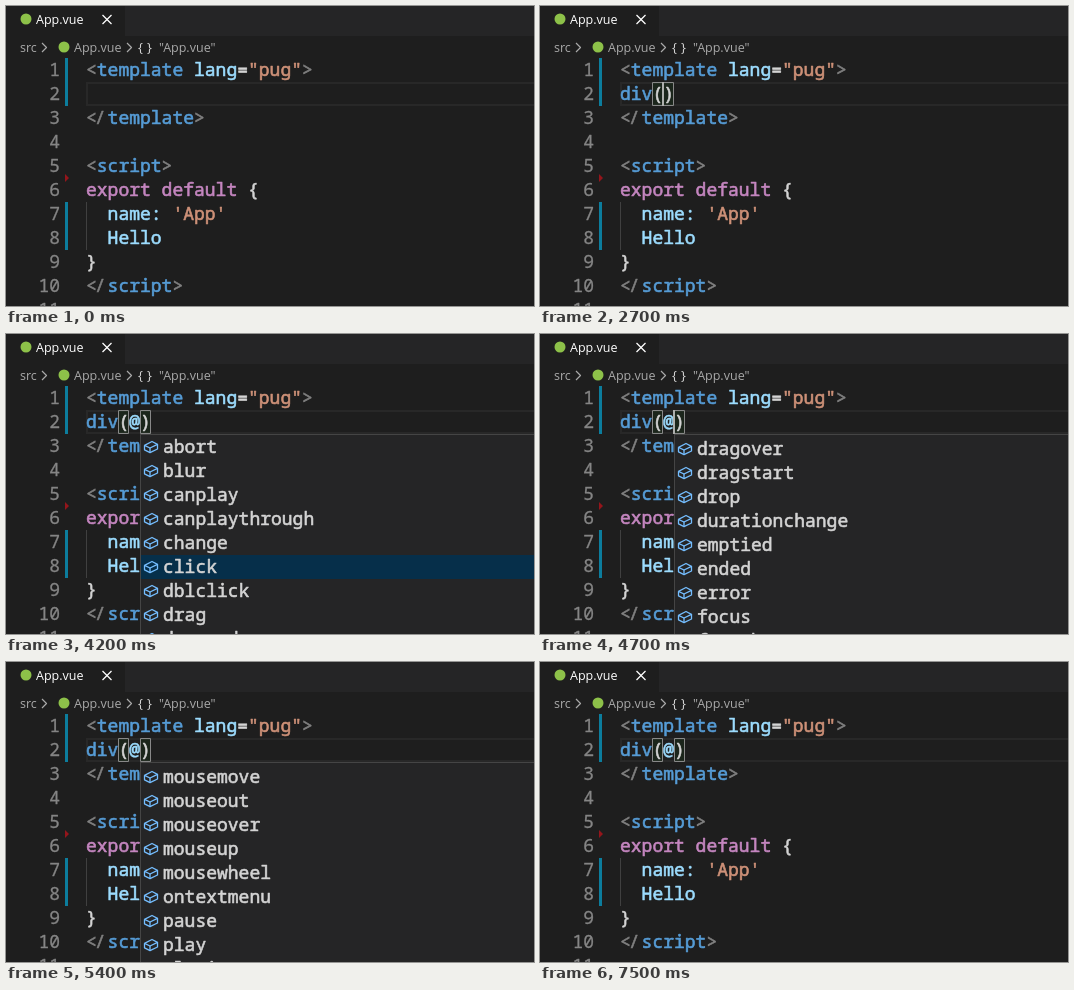
These frames come from a looping animation (528 px wide and 300 px high, 7600 ms). An HTML page with a canvas:

```html
<!DOCTYPE html>
<html lang="en">
<head>
<meta charset="utf-8">
<title>Editor autocomplete</title>
<style>
html, body { margin: 0; width: 100%; height: 100%; overflow: hidden; background: #1e1e1e; }
canvas { display: block; }
</style>
</head>
<body>
<canvas id="stage" width="528" height="300"></canvas>
<script>
const ctx = document.getElementById('stage').getContext('2d', { alpha: false });
const LOOP = 7600, CHAR = 10.8, LINE = 24, LEFT = 80, TOP = 52;
const CODE_FONT = '18px "Noto Sans Mono", monospace';
const UI_FONT = '12.5px "Open Sans", sans-serif';
const GREY = '#808080', BLUE = '#569cd6', SKY = '#9cdcfe', PINK = '#c586c0',
  ORANGE = '#ce9178', LIGHT = '#d4d4d4', GREEN = '#8dc149';

const closingTag = name => [['<', GREY], ['/', GREY, -2], [name, BLUE], ['>', GREY]];
const lines = [
  [['<', GREY], ['template', BLUE], [' lang', SKY], ['=', LIGHT], ['"pug"', ORANGE], ['>', GREY]],
  [],
  closingTag('template'),
  [],
  [['<', GREY], ['script', BLUE], ['>', GREY]],
  [['export default', PINK], [' {', LIGHT]],
  [['  name:', SKY], [" 'App'", ORANGE]],
  [['  Hello', SKY]],
  [['}', LIGHT]],
  closingTag('script'),
  []
];

const events = `abort blur canplay canplaythrough change click dblclick drag dragend
dragenter dragleave dragover dragstart drop durationchange emptied ended error focus
formchange forminput input invalid keydown keypress keyup load loadeddata loadedmetadata
loadstart mousedown mousemove mouseout mouseover mouseup mousewheel ontextmenu pause play
playing progress ratechange readystatechange reset resize scroll seeked seeking select
show stalled storage submit suspend`.split(/\s+/);

// Times at which the caret flips, starting hidden.
const blinks = [500, 2200, 2700, 3300, 3800, 4200, 4700, 5200, 5600, 6100, 6500, 7000, 7400, 7500];

function rect(x, y, w, h, color) {
  ctx.fillStyle = color;
  ctx.fillRect(x, y, w, h);
}

function frame(x, y, w, h, color) {
  ctx.strokeStyle = color;
  ctx.lineWidth = 1;
  ctx.strokeRect(x + .5, y + .5, w - 1, h - 1);
}

function text(str, x, y, color, font = UI_FONT) {
  ctx.font = font;
  ctx.fillStyle = color;
  ctx.fillText(str, x, y);
}

// Code is set a little heavier than the regular face.
function mono(str, x, y, color, weight = .6) {
  text(str, x, y, color, CODE_FONT);
  ctx.lineWidth = weight;
  ctx.lineJoin = 'round';
  ctx.strokeStyle = color;
  ctx.strokeText(str, x, y);
}

function path(points, color, width = 1, fill = false) {
  ctx.beginPath();
  points.forEach(([x, y]) => ctx.lineTo(x, y));
  ctx.lineWidth = width;
  ctx.strokeStyle = ctx.fillStyle = color;
  fill ? ctx.fill() : ctx.stroke();
}

function dot(x, y) {
  ctx.beginPath();
  ctx.arc(x, y, 5.5, 0, 7);
  ctx.fillStyle = GREEN;
  ctx.fill();
}

function code(parts, row) {
  let x = LEFT;
  for (const [str, color, shift = 0] of parts) {
    mono(str, x + shift, TOP + row * LINE + 18, color);
    x += str.length * CHAR;
  }
}

function header() {
  rect(119, 0, 409, 30, '#252526');
  dot(20, 13);
  text('App.vue', 30, 18, '#fff');
  path([[96.5, 9], [105.5, 18]], '#fff', 1.2);
  path([[105.5, 9], [96.5, 18]], '#fff', 1.2);

  const crumb = '#a9a9a9';
  text('src', 14, 46, crumb);
  for (const x of [36, 121]) path([[x, 37], [x + 4.5, 41.5], [x, 46]], crumb, 1.2);
  dot(58, 41);
  text('App.vue', 68, 46, crumb);
  text('{', 132, 45.5, LIGHT, '13px "Open Sans", sans-serif');
  text('}', 141, 45.5, LIGHT, '13px "Open Sans", sans-serif');
  text('"App.vue"', 153, 46, crumb);
}

function editor(typed) {
  rect(80, 76, 448, 2, '#282828');
  rect(80, 98, 448, 2, '#282828');
  rect(80, 76, 2, 24, '#282828');
  rect(80, 196, 1, 48, '#404040');
  for (const y of [52, 196]) rect(59, y, 3, 48, '#0c7d9d');
  path([[59, 168], [63, 172], [59, 176]], '#94151b', 1, true);

  ctx.textAlign = 'right';
  lines.forEach((_, i) => mono(i + 1, 54, TOP + i * LINE + 18, '#858585', .3));
  ctx.textAlign = 'left';

  lines.forEach(code);
  const attr = typed.includes('@') ? '@' : '';
  const open = typed.indexOf('(');
  if (open > 0) {
    for (const col of [open, typed.length - 1]) {
      const x = Math.round(LEFT + col * CHAR);
      rect(x, 76, 11, 24, 'rgba(0,100,0,.1)');
      frame(x, 76, 11, 24, '#888');
    }
    code([['div', BLUE], ['(', LIGHT], [attr, SKY], [')', LIGHT]], 1);
  } else {
    code([[typed, BLUE]], 1);
  }
}

function tagPopup(typed) {
  const x = Math.round(LEFT + typed.length * CHAR);
  rect(x, 100, 432, 28, '#062f4a');
  frame(x, 100, 432, 28, '#454545');
  ctx.setLineDash([2, 1]);
  frame(x + 5, 107, 13, 13, '#d4d4d4');
  ctx.setLineDash([]);
  mono(typed, x + 23, 119, '#0097fb', 1.1);
  mono('div'.slice(typed.length), x + 23 + typed.length * CHAR, 119, LIGHT);
  mono('div', x + 389, 119, '#98a7b1');
}

function cube(x, y) {
  const at = points => points.map(([px, py]) => [x + px, y + py]);
  const color = '#75beff';
  path(at([[1.5, 6.3], [9, 2.5], [14.5, 5.3], [14.5, 10], [7, 13.6], [1.5, 10.8], [1.5, 6.3]]), color, 1.3);
  path(at([[1.5, 6.3], [7, 9], [14.5, 5.3]]), color, 1.3);
  path(at([[7, 9], [7, 13.6]]), color, 1.3);
}

function eventPopup(t) {
  const step = Math.floor(t / 100);
  const first = step < 45 ? 0 : Math.round(11 + (Math.min(step, 57) - 47) * 20 / 7);
  const focus = step < 37 ? 0 : step < 41 ? 1 : step < 42 ? 2 : step < 43 ? 5 : first + 11;
  // Once scrolled, the list aligns to its bottom edge.
  const listTop = first ? 103 : 101;
  rect(134, 100, 394, 200, '#252526');
  rect(134, 100, 394, 1, '#454545');
  rect(134, 100, 1, 200, '#454545');
  for (let row = 0; row < 9; row++) {
    const y = listTop + row * LINE;
    if (first + row === focus) rect(135, y, 393, LINE, '#062f4a');
    cube(137, y + 4);
    mono(events[first + row], 157, y + 18, LIGHT);
  }
}

function draw(t) {
  const typed = t < 1000 ? '' : t < 1300 ? 'd' : t < 1800 ? 'div' : t < 2900 ? 'div()' : 'div(@)';
  rect(0, 0, 528, 300, '#1e1e1e');
  header();
  editor(typed);
  if (t >= 1000 && t < 1800) tagPopup(typed);
  if (t >= 2900 && t < 7500) eventPopup(t);

  if (blinks.filter(time => time <= t).length % 2) {
    const col = typed.endsWith(')') ? typed.length - 1 : typed.length;
    rect(col ? Math.round(LEFT + col * CHAR - 1) : LEFT, 76, 2, LINE, '#aeafad');
  }
}

const start = performance.now();
function tick() {
  draw((performance.now() - start) % LOOP);
  requestAnimationFrame(tick);
}
tick();
</script>
</body>
</html>
```
